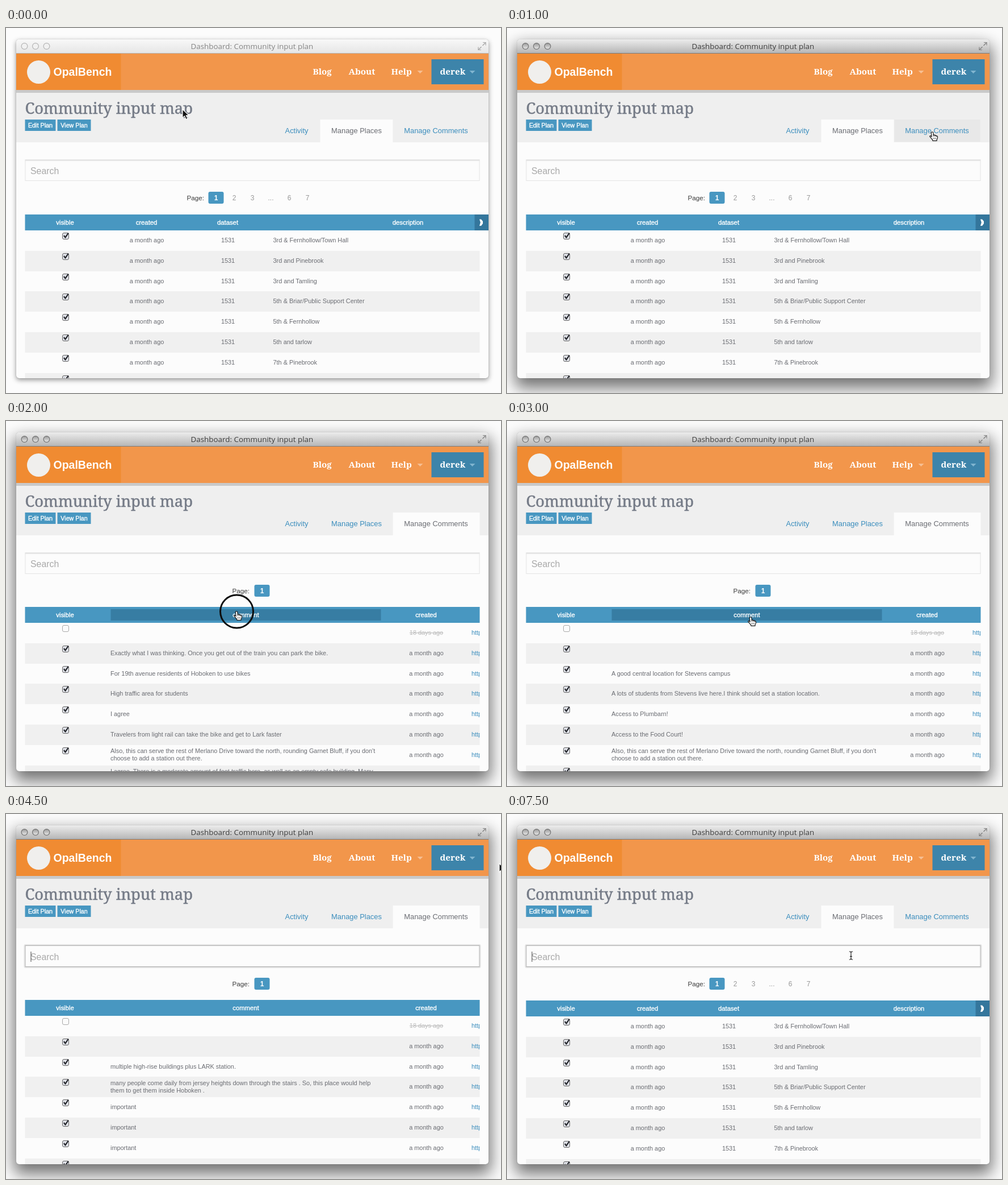
Animation, 872 px wide and 642 px high, one loop 8000 ms. Source, as an HTML page:

```html
<!DOCTYPE html>
<html lang="en">
<head>
<meta charset="utf-8">
<title>Dashboard</title>
<style>
  html, body { margin: 0; width: 100%; height: 100%; overflow: hidden; background: #fcfcfc; }
  #win {
    position: absolute; left: 17.5px; top: 20px; width: 832px; height: 595.5px;
    overflow: hidden; border-radius: 5px; background: #fcfcfc;
    box-shadow: 0 0 1px rgba(0,0,0,.45), 0 13px 28px 4px rgba(0,0,0,.55);
  }
  #win.idle { box-shadow: 0 0 1px rgba(0,0,0,.4), 0 3px 9px rgba(0,0,0,.42); }
  svg { display: block; position: absolute; left: 0; top: 0; }
  text { font-family: "Liberation Sans", Arial, sans-serif; white-space: pre; }
  .slab { font-family: "Noto Serif", serif; }
  .bar { font-family: "Open Sans", "Noto Sans", sans-serif; }
  .bold { font-weight: 700; }
  .med { stroke: #fff; stroke-width: .35px; }
  .mid { text-anchor: middle; }
</style>
</head>
<body>
<div id="win"><svg id="page" width="832" height="595.5" viewBox="17.5 20 832 595.5"></svg></div>
<svg id="top" width="872" height="642" viewBox="0 0 872 642"></svg>
<script>
const BLUE = '#4897c1', LINK = '#3a8dbd', INK = '#6a6c72', PAPER = '#fcfcfc';
const LEFT = 17.5, RIGHT = 849.5, PITCH = 35.8;

const rect = (x, y, x2, y2, fill, more = '') =>
  `<rect x="${x}" y="${y}" width="${x2 - x}" height="${y2 - y}" fill="${fill}" ${more}/>`;
const text = (s, x, y, size, fill, cls = '', more = '') =>
  `<text x="${x}" y="${y}" font-size="${size}" fill="${fill}" class="${cls}" ${more}>${s.replace(/&/g, '&amp;')}</text>`;
const poly = (pts, fill, more = '') => `<polygon points="${pts}" fill="${fill}" ${more}/>`;
const line = (pts, stroke, width) =>
  `<polyline points="${pts}" fill="none" stroke="${stroke}" stroke-width="${width}"/>`;

const places = [
  '3rd & Fernhollow/Town Hall', '3rd and Pinebrook', '3rd and Tamling',
  '5th & Briar/Public Support Center', '5th & Fernhollow', '5th and tarlow',
  '7th & Pinebrook', ''
];
// A bar splits a comment into two lines.
const also = "Also, this can serve the rest of Merlano Drive toward the north, rounding Garnet Bluff, if you don't|choose to add a station out there.";
const lists = {
  fresh: ['',
    'Exactly what I was thinking. Once you get out of the train you can park the bike.',
    'For 19th avenue residents of Hoboken to use bikes',
    'High traffic area for students', 'I agree',
    'Travelers from light rail can take the bike and get to Lark faster', also,
    'I agree. There is a moderate amount of foot traffic here, as well as an empty cafe building. Many|'],
  up: ['', '', 'A good central location for Stevens campus',
    'A lots of students from Stevens live here.I think should set a station location.',
    'Access to Plumbarn!', 'Access to the Food Court!', also, ''],
  down: ['', '', 'multiple high-rise buildings plus LARK station.',
    'many people come daily from jersey heights down through the stairs . So, this place would help|them to get them inside Hoboken .',
    'important', 'important', 'important', '']
};

// One entry per half second; no list means the places page.
const steps = [
  { cur: 'arrow', x: 311, y: 143, idle: true },
  { cur: 'arrow', x: 530, y: 158, idle: true },
  { cur: 'hand', x: 749, y: 183, tab: true },
  { cur: 'hand', x: 746, y: 187, list: 'fresh' },
  { cur: 'hand', x: 406, y: 335, list: 'fresh', head: true, ring: true },
  { cur: 'hand', x: 415, y: 339, list: 'up', head: true },
  { cur: 'hand', x: 429, y: 345, list: 'up', head: true },
  { cur: 'hand', x: 429, y: 343, list: 'down', head: true },
  { cur: 'beam', x: 480, y: 256, list: 'down' },
  { cur: 'arrow', x: 869, y: 87, list: 'down', focus: true },
  { cur: 'hand', x: 625, y: 181 },
  { cur: 'arrow', x: 597, y: 216 },
  { cur: 'beam', x: 567, y: 260 },
  { cur: 'beam', x: 568.5, y: 254 },
  { cur: 'beam', x: 568.5, y: 254, focus: true },
  { cur: 'beam', x: 606, y: 249, focus: true }
];

function titleBar(idle) {
  const [a, b, edge, ink, ring] = idle
    ? ['#f8f8f8', '#e6e6e6', '#b4b4b4', '#858585', '#b4b4b4']
    : ['#ececec', '#b6b6b6', '#7c7c7c', '#3c3c3c', '#717171'];
  const knob = idle ? '#f1f1f1' : 'url(#knob)';
  let s = `<defs><linearGradient id="bar" x2="0" y2="1"><stop stop-color="${a}"/><stop offset="1" stop-color="${b}"/></linearGradient>
    <linearGradient id="knob" x2="0" y2="1"><stop stop-color="#9a9a9a"/><stop offset="1" stop-color="#e9e9e9"/></linearGradient></defs>`;
  s += rect(LEFT, 20, RIGHT, 44, 'url(#bar)') + rect(LEFT, 44, RIGHT, 45, edge);
  for (const x of [32, 51.5, 71])
    s += `<circle cx="${x}" cy="32" r="5.4" fill="${knob}" stroke="${ring}" stroke-width="1.2"/>`;
  s += text('Dashboard: Community input plan', 325, 37, 13.4, ink, 'bar');
  const mark = idle ? '#a8a8a8' : '#848484';
  return s + line('839.5,25.5 844.5,25.5 844.5,30.5', mark, 1.2) + line('844.5,25.5 839,31', mark, 1.4) +
    line('831.5,33.5 831.5,38.5 836.5,38.5', mark, 1.2) + line('831.5,38.5 837,33', mark, 1.4);
}

function siteHeader() {
  const caret = (x, fill) => poly(`${x - 5},75 ${x + 5},75 ${x},80`, fill);
  const nav = (s, x) => text(s, x, 82, 15.2, '#fff', 'slab bold');
  return rect(LEFT, 45, RIGHT, 109, '#f2964b') + rect(LEFT, 45, 202, 109, '#f08b32') +
    '<circle cx="57" cy="77.5" r="20.5" fill="#f0efed"/>' +
    text('OpalBench', 83, 84, 19.5, '#fff', 'bold') +
    nav('Blog', 540) + nav('About', 603) + nav('Help', 678) + caret(729, '#f7bf92') +
    rect(749, 55, 841, 99, '#3d84aa') + nav('derek', 764) + caret(821, '#80b5d0') +
    rect(LEFT, 109, RIGHT, 114, '#c9c9c9') + rect(LEFT, 114, RIGHT, 201, '#efefef') +
    text('Community input map', 33, 151, 27.35, '#757b87', 'slab', 'stroke="#757b87" stroke-width=".5"') +
    rect(33, 161, 87, 181, BLUE) + text('Edit Plan', 60, 175, 10.8, '#fff', 'med mid') +
    rect(90, 161, 149, 181, BLUE) + text('View Plan', 119.5, 175, 10.7, '#fff', 'med mid');
}

function tabs(st) {
  const tab = (s, x, on) => text(s, x, 185, 12.9, on ? INK : LINK, 'mid');
  const back = st.list ? rect(681, 161, 834, 201, PAPER) : rect(553, 161, 681, 201, PAPER);
  return back + (st.tab ? rect(682, 161, 833, 200, '#e8e8e8') : '') +
    tab('Activity', 511.5, false) + tab('Manage Places', 617, !st.list) +
    tab('Manage Comments', 757, !!st.list);
}

function search(focus) {
  let s = '';
  if (focus) {
    s += rect(32, 230, 835, 270, 'none', 'stroke="#e3e3e3" stroke-width="2" rx="2"');
    s += rect(33.5, 231.5, 833.5, 268.5, PAPER, 'stroke="#adadad"');
  } else {
    s += rect(33.5, 232.5, 833.5, 268.5, PAPER, 'stroke="#e4e4e4"') + rect(33, 231, 834, 234, '#e6e6e6');
  }
  s += text('Search', 42.5, 256.5, 15.9, '#a9a9a9');
  return s + (focus ? rect(43, 242, 44, 260, '#444') : '');
}

function pager(comments) {
  const x = comments ? 398 : 318, box = comments ? 437 : 356;
  let s = text('Page:', x, 303, 11.7, '#3c3c3c') +
    rect(box, 288, box + 27, 309, BLUE, 'rx="3"') +
    text('1', box + 13.5, 303, 12, '#fff', 'bold mid');
  if (!comments)
    [['2', 401.5], ['3', 433.5], ['...', 466], ['6', 498.5], ['7', 530.5]]
      .forEach(([n, cx]) => s += text(n, cx, 303, 12, '#999', 'mid'));
  return s;
}

function check(y, on) {
  return rect(99, y - 5.5, 110, y + 5.5, on ? '#dfe1e7' : '#fbfbfb',
    `rx="2.5" stroke="${on ? '#666' : '#aaa'}"`) +
    (on ? line(`101.4,${y - 1} 104,${y + 2.4} 109.4,${y - 5.4}`, '#23252b', 2.1) : '');
}

function table(st) {
  const comments = !!st.list, top = comments ? 327 : 328;
  const small = (s, x, y, cls = '', fill = INK, more = '') => text(s, x, y, 10.9, fill, cls, more);
  const head = (s, x) => text(s, x, top + 18, 11.3, '#fff', 'med mid');
  let s = rect(33, top, 834, top + 28, BLUE);
  if (st.head) s += rect(184, 331, 660, 351, '#377da3');
  s += head('visible', 103.5);
  if (comments) {
    s += head('comment', 422) + head('created', 739.5);
  } else {
    s += head('created', 247) + head('dataset', 390) + head('description', 707.5) +
      rect(825, 328, RIGHT, 356, '#34769c') +
      poly('833.5,336.5 836.5,336.5 839.5,340 839.5,344 836.5,348 833.5,348 835.3,342', '#fff');
  }
  const rows = comments ? lists[st.list] : places;
  rows.forEach((label, i) => {
    const y = top + 28 + i * PITCH, base = y + 21;
    const off = comments && i === 0, tall = label.endsWith('|');
    if (i % 2) s += rect(33, Math.round(y), 834, Math.round(y + PITCH), '#f0f0f0');
    if (!tall) s += check(Math.round(y + 10), !off);
    if (!comments) {
      s += small('a month ago', 247.5, base, 'mid') + small('1531', 390.5, base, 'mid') +
        small(label, 470, base);
      return;
    }
    const parts = label.split('|');
    parts.forEach((p, k) => s += small(p, 183.5, base + (parts.length > 1 ? k * 13 - 6.8 : 0)));
    s += off
      ? small('18 days ago', 740, base, 'mid', '#bbb', 'text-decoration="line-through"')
      : small('a month ago', 740, base, 'mid');
    s += `<svg x="815" y="${base - 12}" width="19" height="18">${small('http', 4.5, 12, '', LINK)}</svg>`;
  });
  return s;
}

const cursors = {
  arrow: () => poly('0,0 0,15 3.6,11.8 6.2,17.6 8.8,16.4 6.3,10.8 11,10.6', '#111',
    'stroke="#fff" stroke-width="1.1"'),
  hand: () => '<g transform="scale(.9)">' +
    poly('-2,1 -1,0 1,0 2,1 2.4,6 4,5.4 5.4,6.6 7,6.3 8.2,7.6 9.6,7.6 10.6,9 10.4,12 9,15 9,17 1,17 0.6,15 -2.4,11.6 -4.8,8.4 -4,7.2 -2.6,7.6 -1,9.4',
      '#fff', 'stroke="#161616" stroke-width="1.3" stroke-linejoin="round"') +
    line('2.4,6 2.6,9', '#222', 1) + line('5.4,6.6 5.5,9', '#222', 1) + line('8.2,7.6 8.2,9.5', '#222', 1) +
    line('2.3,11 2.3,14', '#444', .9) + line('4.7,11 4.7,14', '#444', .9) + line('7,11 7,14', '#444', .9) + '</g>',
  beam: () => ['#fff', '#222'].map((c, i) => {
    const w = i ? 1.2 : 2.6;
    return line('-3.2,-7 -1.2,-7 0,-5.8 1.2,-7 3.2,-7', c, w) + line('0,-6 0,6', c, w) +
      line('-3.2,7 -1.2,7 0,5.8 1.2,7 3.2,7', c, w) + line('-2,1.5 2,1.5', c, w);
  }).join('')
};

const win = document.getElementById('win');
const page = document.getElementById('page');
const overlay = document.getElementById('top');
let shown = -1;

function draw(n) {
  const st = steps[n];
  win.className = st.idle ? 'idle' : '';
  page.innerHTML = titleBar(st.idle) + siteHeader() + tabs(st) + search(st.focus) +
    pager(!!st.list) + table(st);
  overlay.innerHTML =
    (st.ring ? '<circle cx="406.5" cy="335" r="29" fill="none" stroke="#0c0c0c" stroke-width="3"/>' : '') +
    `<g transform="translate(${st.x} ${st.y})">${cursors[st.cur]()}</g>`;
}

function tick() {
  const n = Math.floor(performance.now() % 8000 / 500);
  if (n !== shown) draw(shown = n);
  requestAnimationFrame(tick);
}
tick();
</script>
</body>
</html>
```
